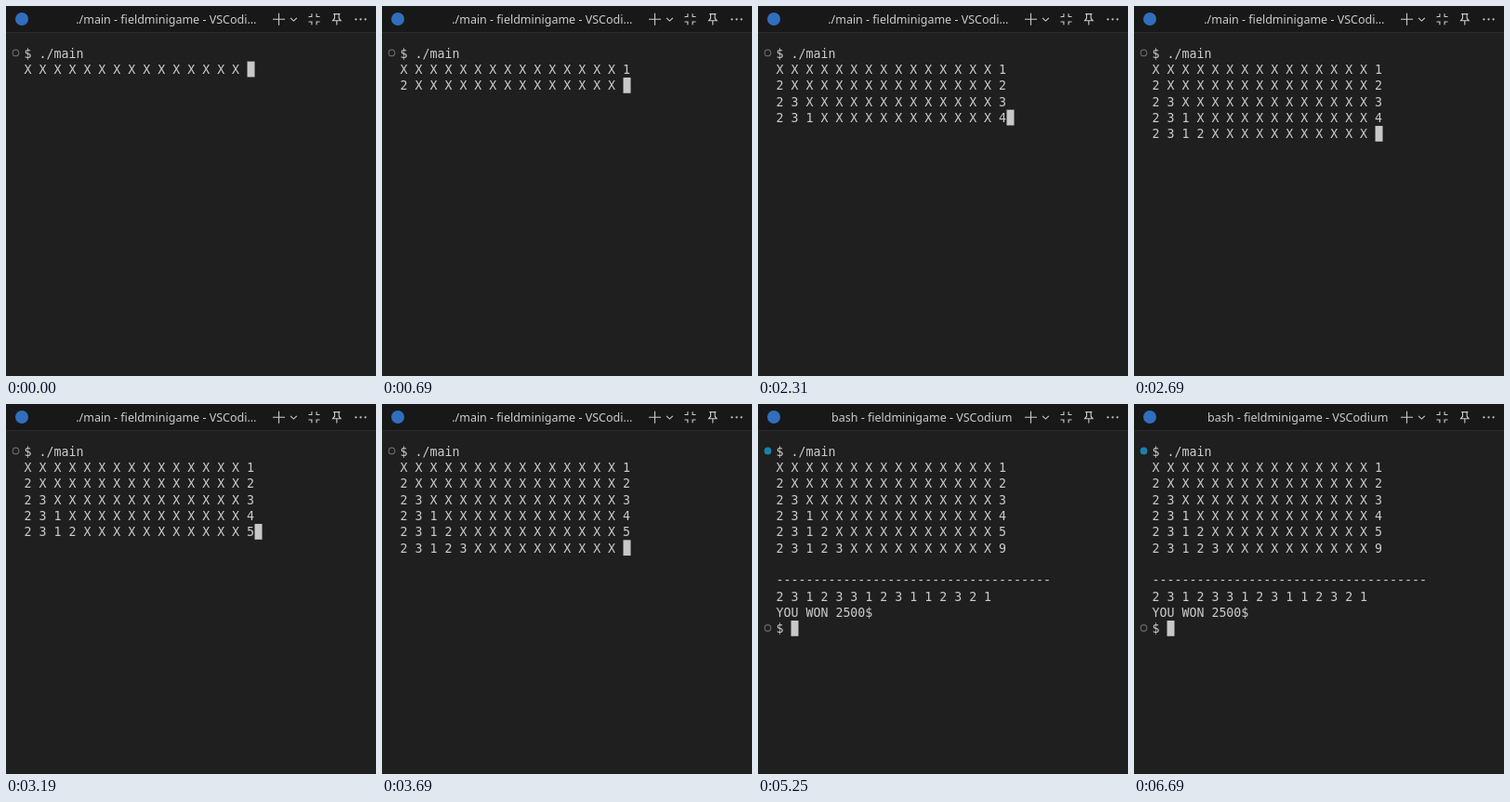
Recreate the animation shown at these times as an HTML page. Size 398 px wide and 398 px high, loop 7000 ms.

```html
<!DOCTYPE html>
<html lang="en">
<head>
<meta charset="utf-8">
<title>Terminal</title>
<style>
  html, body { margin: 0; width: 100%; height: 100%; overflow: hidden; background: #1f1f1f; }
  svg { display: block; width: 398px; height: 398px; }
  .title { font: 12.5px "Noto Sans", sans-serif; fill: #ccc; }
  .term text { font: 13.288px "DejaVu Sans Mono", monospace; fill: #ccc; white-space: pre; font-variant-ligatures: none; }
  .icons { fill: none; stroke: #ccc; stroke-width: 1.1; }
</style>
</head>
<body>
<svg viewBox="0 0 398 398">
  <rect width="398" height="398" fill="#1f1f1f"/>
  <rect width="398" height="28" fill="#181818"/>
  <rect y="28" width="398" height="1" fill="#2b2b2b"/>
  <circle cx="17" cy="14" r="7" fill="#2f6fbd"/>
  <text id="title" class="title" y="18.5"></text>
  <g class="icons">
    <path d="M287 14.2h13M293.5 7.7v13"/>
    <path d="M306 12.8l3.4 3.3 3.4-3.3"/>
    <path d="M325.5 11.5h3.4v-3.3M337.5 11.5h-3.4v-3.3M325.5 17h3.4v3.3M337.5 17h-3.4v3.3"/>
    <path d="M352.2 8.6h7.2M353.5 8.6v4.6l-2 2.6h8.6l-2-2.6v-4.6M355.8 15.8v4.6"/>
    <g fill="#ccc" stroke="none">
      <circle cx="376.4" cy="14.3" r="1.1"/>
      <circle cx="381.5" cy="14.3" r="1.1"/>
      <circle cx="386.6" cy="14.3" r="1.1"/>
    </g>
  </g>
  <rect id="guide" x="3" y="63" width="2" height="169" fill="#37373d"/>
  <circle id="firstDot" cx="10.5" cy="50.4" r="3.3" stroke-width="1.2"/>
  <circle id="nextDot" cx="10.5" cy="241" r="3.3" stroke-width="1.2" fill="none" stroke="#666"/>
  <g id="term" class="term"></g>
  <rect id="cursor" width="8" height="16.8" fill="#c8c8c8"/>
</svg>
<script>
const LOOP = 7000, LEFT = 19.5, BASE = 55.8, COL = 8, ROW = 17.33;
const GUESSES = "123459";
const ENTER = [0, 690, 1440, 2060, 2690, 3690];
const TYPED = [310, 1060, 1690, 2310, 3000, 4380];
const RESULT = 5060, PROMPT = 5130, DONE = 5190;
const GUIDE = [6190, 6690];
const FIELD = [..."231233123112321"];

const $ = id => document.getElementById(id);
const show = (el, on) => el.setAttribute("visibility", on ? "visible" : "hidden");

const lines = Array.from({ length: 12 }, (_, i) => {
  const el = document.createElementNS("http://www.w3.org/2000/svg", "text");
  el.setAttribute("x", LEFT);
  el.setAttribute("y", BASE + i * ROW);
  return $("term").appendChild(el);
});

const fieldRow = known => FIELD.map((c, i) => i < known ? c : "X").join(" ") + " ";

function screen(t) {
  const out = ["$ ./main"];
  ENTER.forEach((start, i) => {
    if (t >= start) out.push(fieldRow(i) + (t >= TYPED[i] ? GUESSES[i] : ""));
  });
  if (t >= RESULT) {
    out.push("", "-".repeat(37), FIELD.join(" "), "YOU WON 2500$", t >= PROMPT ? "$ " : "");
  }
  return out;
}

function render(t) {
  const out = screen(t), last = out.length - 1, done = t >= DONE;
  lines.forEach((el, i) => { el.textContent = out[i] || ""; });
  $("cursor").setAttribute("x", LEFT + out[last].length * COL);
  $("cursor").setAttribute("y", BASE - 13.5 + last * ROW);

  $("title").textContent = done ? "bash - fieldminigame - VSCodium" : "./main - fieldminigame - VSCodi…";
  $("title").setAttribute("x", done ? 79 : 75.2);
  $("firstDot").setAttribute("fill", done ? "#1b81a8" : "none");
  $("firstDot").setAttribute("stroke", done ? "#1b81a8" : "#666");
  show($("nextDot"), t >= PROMPT);
  show($("guide"), t >= GUIDE[0] && t < GUIDE[1]);
}

const begin = performance.now();
function tick() {
  render((performance.now() - begin) % LOOP);
  requestAnimationFrame(tick);
}
tick();
</script>
</body>
</html>
```
